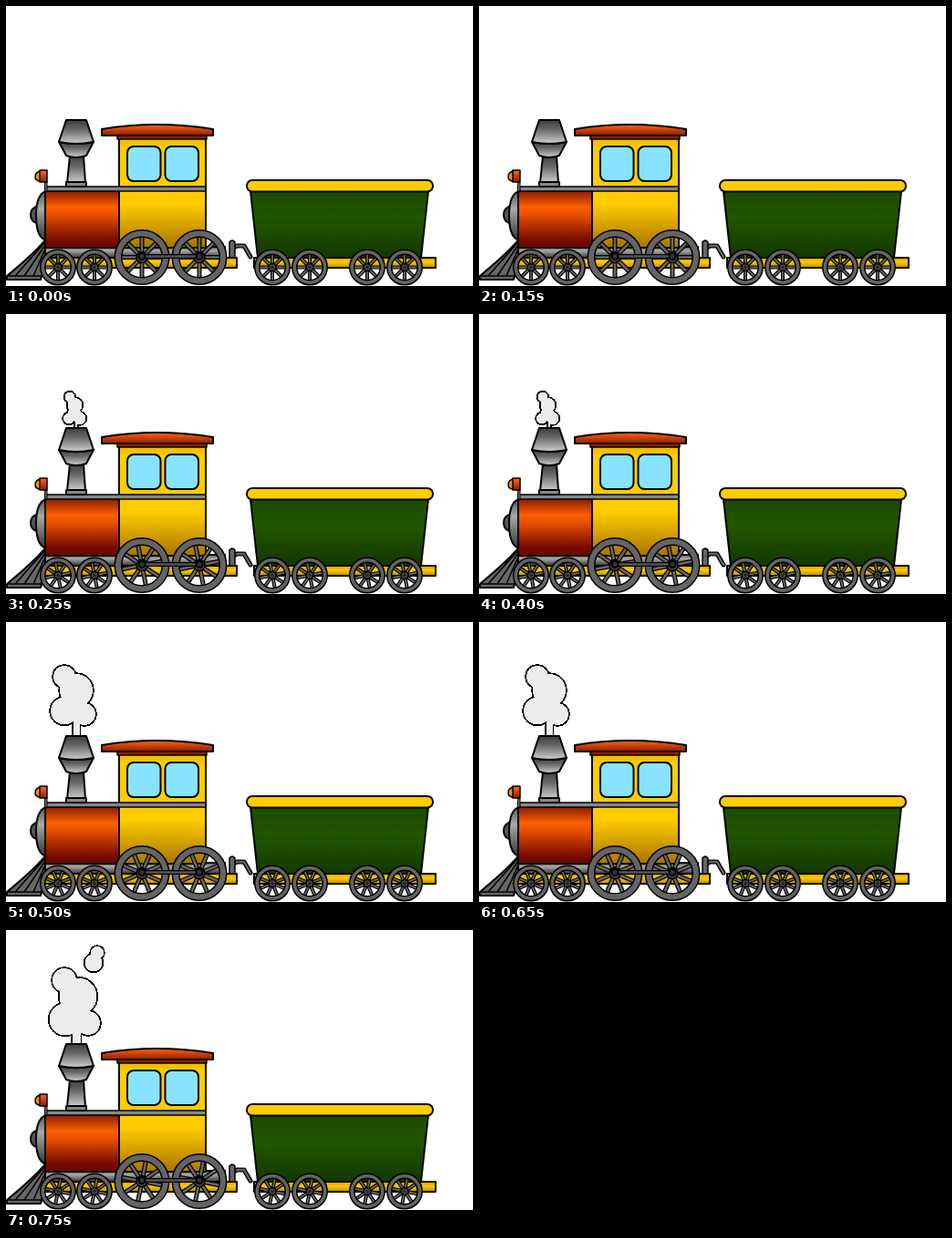
An HTML page for the animation above (1 s loop, 512 px wide and 307 px high).

```html
<!DOCTYPE html>
<html lang="en">
<head>
<meta charset="utf-8">
<title>Steam train</title>
<style>
html, body { margin: 0; width: 100%; height: 100%; overflow: hidden; background: #fff; }
svg { display: block; width: 100vw; height: 100vh; }
.ink { stroke: #000; stroke-width: 2; stroke-linejoin: round; stroke-linecap: round; }
#smoke { shape-rendering: crispEdges; }
</style>
</head>
<body>
<svg viewBox="0 0 512 307">
  <defs>
    <linearGradient id="boiler" x2="0" y2="1">
      <stop stop-color="#901c00"/><stop offset=".28" stop-color="#fa6000"/>
      <stop offset=".42" stop-color="#e85000"/><stop offset=".85" stop-color="#780c00"/><stop offset="1" stop-color="#6c0800"/>
    </linearGradient>
    <linearGradient id="cab" x2="0" y2="1">
      <stop stop-color="#eab800"/><stop offset=".1" stop-color="#ffcc00"/>
      <stop offset=".6" stop-color="#ffcc00"/><stop offset="1" stop-color="#a87400"/>
    </linearGradient>
    <linearGradient id="roof" x2="0" y2="1">
      <stop stop-color="#f06a20"/><stop offset=".45" stop-color="#d04408"/><stop offset="1" stop-color="#8c2000"/>
    </linearGradient>
    <linearGradient id="funnel" x2="0" y2="1">
      <stop stop-color="#3c3c3c"/><stop offset=".4" stop-color="#686868"/><stop offset="1" stop-color="#d0d0d0"/>
    </linearGradient>
    <linearGradient id="steel" x2="0" y2="1">
      <stop stop-color="#555"/><stop offset=".35" stop-color="#aaa"/><stop offset="1" stop-color="#333"/>
    </linearGradient>
    <linearGradient id="beam" x2="0" y2="1">
      <stop stop-color="#d69c00"/><stop offset=".4" stop-color="#ffcc00"/><stop offset="1" stop-color="#c08b00"/>
    </linearGradient>
    <linearGradient id="wagon" x2="0" y2="1">
      <stop stop-color="#1c4a00"/><stop offset=".4" stop-color="#205600"/><stop offset="1" stop-color="#143800"/>
    </linearGradient>
  </defs>

  <g class="ink">
    <rect x="42" y="276" width="211" height="11" fill="url(#beam)"/>
    <rect x="272" y="276" width="199" height="11" fill="url(#beam)"/>

    <path d="M42 258Q30 272 1 296V300H38L46 270Z" fill="#666"/>
    <path d="M42 260L10 296M43 262L20 296M44 264L30 296M3 296H38" fill="none" stroke-width="1.5"/>
    <path d="M43 264H240V276H43Z" fill="url(#steel)"/>
    <path d="M36 219Q27 221 27 229T36 239Z" fill="#555"/>
    <path d="M44 203Q33 206 33 230T44 257Z" fill="url(#steel)"/>
    <rect x="43" y="203" width="82" height="62" fill="url(#boiler)"/>
    <path d="M124 144H219V265H124Z" fill="url(#cab)"/>
    <path d="M43 198H219V203H43Z" fill="#888" stroke-width="1.5"/>
    <path d="M105 135Q165 125 227 135V142H105Z" fill="url(#roof)"/>
    <path d="M122 142H220V146H122Z" fill="#8c2000" stroke-width="1.5"/>
    <rect x="133" y="154" width="36.5" height="38" rx="7" fill="#87e3ff"/>
    <rect x="174.5" y="154" width="36.5" height="38" rx="7" fill="#87e3ff"/>

    <path d="M70 164H85L87 194H67Z" fill="url(#funnel)"/>
    <rect x="66" y="193" width="22" height="5" fill="#888"/>
    <path d="M58 149Q77 153 96 149L88 164Q77 168 66 164Z" fill="url(#funnel)"/>
    <path d="M66 125H88L96 149Q77 153 58 149Z" fill="url(#funnel)"/>

    <path d="M43 193H45V203H43Z" fill="#777" stroke-width="1"/>
    <path d="M38 181Q32 182 32 187T38 192Z" fill="#f09000" stroke-width="1.5"/>
    <path d="M37 180H45V193H37Z" fill="url(#roof)" stroke-width="1.5"/>

    <path d="M268 203H463L455 276H276Z" fill="url(#wagon)"/>
    <rect x="264" y="191" width="204" height="12.5" rx="6" fill="#ffcc00"/>

    <path d="M248 266L253 263H261L268 275" fill="none" stroke-width="5"/>
    <path d="M248 266L253 263H261L268 275" fill="none" stroke="#666" stroke-width="2.4"/>
    <path d="M245 259Q248 255 251 259V276H245Z" fill="#666" stroke-width="1.5"/>
  </g>
  <g id="wheels"></g>
  <g class="ink">
    <path d="M149 274.5H212" stroke-width="5"/>
    <path d="M149 274.5H212" stroke="#555" stroke-width="2.4"/>
    <circle cx="149" cy="274.5" r="3.5" fill="#333"/>
    <circle cx="212" cy="274.5" r="3.5" fill="#333"/>
  </g>
  <g id="smoke"></g>
</svg>
<script>
const STEP_MS = 250;
const STEPS = 4;
const SPOKES = 8;
const smallWheels = [57, 97, 292, 333, 396, 437];
const bigWheels = [149, 212];

// Each puff circle is [x, y, radius]; the stem is [half width, top].
const smokeStages = [
  null,
  { stem: [1, 106], puffs: [[70, 91, 5.5], [75.5, 100, 8], [69, 114.5, 6], [81, 114.5, 6.5], [75, 109, 7]] },
  { stem: [3.5, 100], puffs: [[64, 60, 12], [77, 75, 18], [64, 97.5, 15], [86, 101, 12]] },
  { stem: [4.5, 100], puffs: [[64, 55, 13], [79, 73, 20.5], [65, 98, 17.5], [90, 102, 13], [100, 25, 7], [96, 36, 9.5]] }
];

const circle = (x, y, r, style) => `<circle cx="${x}" cy="${y}" r="${r}" ${style}/>`;

function wheel(x, y, radius, rim, hub) {
  const mid = radius - rim / 2;
  let spokes = "";
  for (let i = 0; i < SPOKES; i++) {
    const angle = i * 2 * Math.PI / SPOKES;
    spokes += `M0 0L${mid * Math.cos(angle)} ${mid * Math.sin(angle)}`;
  }
  const big = radius > 25;
  const ring = (color, width) => circle(0, 0, mid, `fill="none" stroke="${color}" stroke-width="${width}"`);
  return `<g transform="translate(${x} ${y})">
    <g class="spokes">
      <path d="${spokes}" stroke="#000" stroke-width="${big ? 5 : 4}"/>
      <path d="${spokes}" stroke="#666" stroke-width="${big ? 2.6 : 1.8}"/>
    </g>
    ${ring("#000", rim)}${ring("#646464", rim - 3)}
    ${circle(0, 0, hub, 'fill="#444" stroke="#000" stroke-width="1.5"')}
    ${circle(0, 0, hub * .4, 'fill="#222"')}
  </g>`;
}

function smokeMarkup(stage) {
  if (!stage) return "";
  const [half, top] = stage.stem;
  const stem = `<path d="M${77 - half} ${top}V124H${77 + half}V${top}Z"/>`;
  const shapes = stem + stage.puffs.map(([x, y, r]) => circle(x, y, r, "")).join("");
  return `<g fill="#000" stroke="#000" stroke-width="3.4">${shapes}</g><g fill="#ebedeb">${shapes}</g>`;
}

const smoke = document.getElementById("smoke");
const wheels = document.getElementById("wheels");
wheels.innerHTML =
  smallWheels.map(x => wheel(x, 286.5, 20, 6.5, 4)).join("") +
  bigWheels.map(x => wheel(x, 275.5, 30.5, 9, 6)).join("");
const spokeGroups = wheels.querySelectorAll(".spokes");

let shown = -1;
function draw(time) {
  const step = Math.floor(time / STEP_MS) % STEPS;
  if (step === shown) return;
  shown = step;
  const turn = -step * 360 / SPOKES / STEPS;
  spokeGroups.forEach(group => group.setAttribute("transform", `rotate(${turn})`));
  smoke.innerHTML = smokeMarkup(smokeStages[step]);
}

const start = performance.now();
function tick() {
  draw(performance.now() - start);
  requestAnimationFrame(tick);
}
tick();
</script>
</body>
</html>
```
